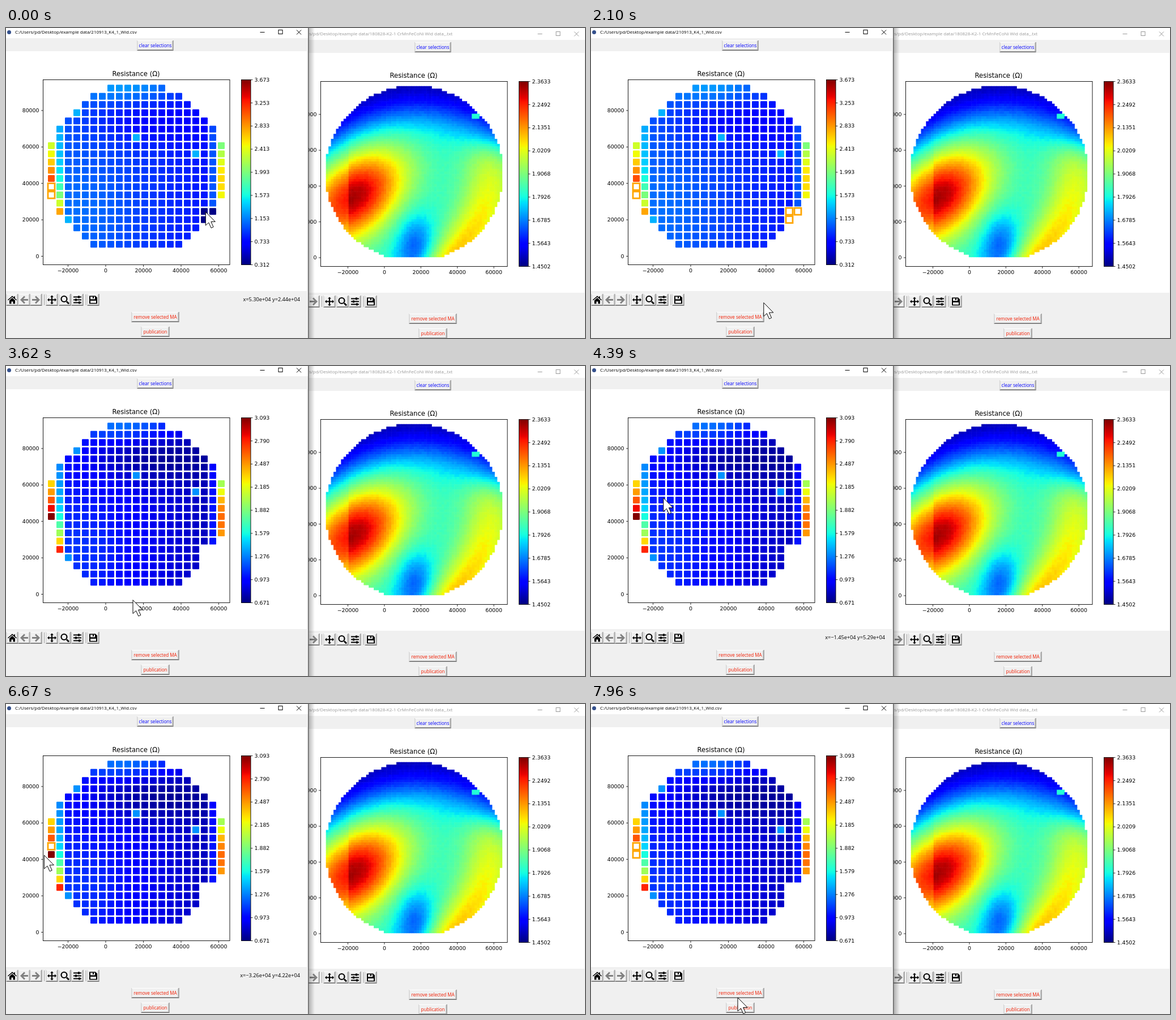
Animation, 1022 px wide and 548 px high, one loop 8000 ms. Source, as an HTML page with a canvas:

```html
<!DOCTYPE html>
<html lang="en">
<head>
<meta charset="utf-8">
<title>Resistance maps</title>
<style>
html, body { margin: 0; width: 100%; height: 100%; overflow: hidden; background: #f0f0f0; }
canvas { display: block; }
</style>
</head>
<body>
<canvas id="stage" width="1022" height="548"></canvas>
<script>
const LOOP = 8000, STEP = 70, PHASE = 20;
const UI = '"Open Sans", sans-serif', PLOT = '"DejaVu Sans", sans-serif';
const stage = document.getElementById('stage').getContext('2d');
let g = stage;

const clamp = v => Math.max(0, Math.min(1, v));
const sigmoid = v => 1 / (1 + Math.exp(-v));

function jet(t) {
  t = clamp(t);
  const channels = [
    Math.min((t - .35) / .31, 1 - (t - .89) / .22),
    Math.min((t - .125) / .25, (.91 - t) / .27),
    Math.min(.5 + t / .22, (.65 - t) / .31)
  ];
  return `rgb(${channels.map(c => Math.round(255 * clamp(c)))})`;
}

function rect(x, y, w, h, color) {
  g.fillStyle = color;
  g.fillRect(x, y, w, h);
}

function text(string, x, y, size, font, color = '#000', align = 'center') {
  g.font = `${size}px ${font}`;
  g.fillStyle = color;
  g.textAlign = align;
  g.textBaseline = 'middle';
  g.fillText(string, x, y);
}

function line(color, width, ...points) {
  g.strokeStyle = color;
  g.lineWidth = width;
  g.beginPath();
  for (const [x, y] of points) g.lineTo(x, y);
  g.stroke();
}

// ---- window furniture ----

function bevel(x, y, w, h, sunken) {
  const [light, dark] = sunken ? ['#696969', '#fff'] : ['#fff', '#696969'];
  rect(x, y, w, h, dark);
  rect(x, y, w - 1, h - 1, light);
  rect(x + 1, y + 1, w - 2, h - 2, sunken ? '#e6e6e6' : '#a0a0a0');
  rect(x + 1, y + 1, w - 3, h - 3, '#f0f0f0');
}

function button(label, y, width, color, pressed) {
  bevel(263.5 - width / 2, y - 9, width, 18, pressed);
  text(label, 263.5, y + .5, 8.1, UI, pressed ? '#000' : color);
}

const ARROW = 'M-7 0L0-7L2-5L-1.5-1.6H7V1.6H-1.5L2 5L0 7Z';
const ICONS = [
  [11, 'M-8 0L0-7L3-4.4V-6H5V-2.6L8 0L7 1L0-5L-7 1ZM-5 1L0-3.4L5 1V7H1.5V3H-1.5V7H-5Z'],
  [32, ARROW, '#808080'],
  [53, ARROW, '#808080', -1],
  [81, 'M0-8L3-5H1V-1H5V-3L8 0L5 3V1H1V5H3L0 8L-3 5H-1V1H-5V3L-8 0L-5-3V-1H-1V-5H-3Z'],
  [104, 'M2 4L4 2L8 6L6 8Z'],
  [126, 'M-7-6H7V-4H-7ZM-7-1H7V1H-7ZM-7 4H7V6H-7ZM1-7H4V-3H1ZM-4-2H-1V2H-4ZM2 3H5V7H2Z', '#000', 1, 'nonzero'],
  [154, 'M-7-7H4L7-4V7H-7ZM-5-5.5V-1H3V-5.5H1V-2.5H-1V-5.5ZM-5 1.5V5.5H5V1.5Z']
];

function toolbar() {
  for (const [x, shape, color = '#000', flip = 1, rule = 'evenodd'] of ICONS) {
    bevel(x - 10.5, 470, 21, 21);
    g.save();
    g.translate(x, 480.5);
    g.scale(flip, 1);
    g.fillStyle = color;
    g.fill(new Path2D(shape), rule);
    if (x === 104) {
      g.lineWidth = 2.2;
      g.strokeStyle = color;
      g.beginPath();
      g.arc(-1.5, -1.5, 5, 0, 7);
      g.stroke();
    }
    g.restore();
  }
  for (const x of [67, 140.5]) rect(x, 471, 1, 19, '#a0a0a0');
}

function frame(title, titleX, ink, pressed) {
  rect(0, -3, 533, 560, '#f0f0f0');
  rect(0, -3, 533, 21, '#fff');
  rect(0, 41, 531, 424, '#fff');
  text(title, titleX, 7.8, 8, UI, ink, 'left');
  line(ink, 1, [448.5, 7.5], [456.5, 7.5]);
  g.strokeRect(481, 3.5, 7, 7);
  line(ink, 1, [513, 3.5], [521, 11.5]);
  line(ink, 1, [521, 3.5], [513, 11.5]);
  button('clear selections', 31, 64, '#00f');
  button('remove selected MA', 511, 84, '#f21c00', pressed);
  button('publication', 537, 50, '#f21c00');
  toolbar();
}

function colorbar(low, high, digits) {
  const ramp = g.createLinearGradient(0, 418.5, 0, 91.5);
  for (let i = 0; i <= 100; i++) ramp.addColorStop(i / 100, jet(i / 100));
  rect(415.5, 91.5, 16.5, 327, ramp);
  for (let i = 0; i <= 8; i++) {
    const y = 418.5 - i * 40.87;
    line('#000', .8, [432, y], [435.5, y]);
    text((low + (high - low) * i / 8).toFixed(digits), 438.5, y + .7, 9.4, PLOT, '#000', 'left');
  }
  g.strokeStyle = '#000';
  g.lineWidth = .9;
  g.strokeRect(415.5, 91.5, 16.5, 327);
}

function axes({ x0, dx, y0, dy }) {
  text('Resistance (Ω)', 229.5, 82.3, 11.6, PLOT);
  for (let i = 0; i < 5; i++) {
    const x = x0 + dx * i, y = y0 - dy * i;
    line('#000', .8, [x, 418.5], [x, 422]);
    line('#000', .8, [65.5, y], [62, y]);
    text(String((i - 1) * 20000).replace('-', '−'), x, 430, 9.4, PLOT);
    text(String(i * 20000), 58.5, y + .7, 9.4, PLOT, '#000', 'right');
  }
  g.strokeStyle = '#000';
  g.lineWidth = .9;
  g.strokeRect(65.5, 91.5, 329.5, 327);
}

// ---- dense map in the rear window; u and v run from -1 to 1 ----

function denseLevel(u, v) {
  const plateau = .39 * sigmoid((v + .7 - .35 * u * u + .06 * u) / .15);
  const du = u + .7, dv = v - .3;
  const hotSpot = .58 * Math.exp(-(du * du / .3 + dv * dv / .26 + 3 * du * dv));
  const crest = .88 - .45 * v * v;
  const ridge = (.22 + .1 * v) * sigmoid((v + .3) / .08) * Math.exp(-(((u - crest) / .34) ** 2));
  const tongue = .22 * sigmoid((v - .6) / .12) * Math.exp(-((u - .02) ** 2) / .05);
  return plateau + hotSpot * (u < -.74 ? .87 : 1) + ridge - tongue;
}

function denseMap() {
  const columns = 70, rows = 68, pitch = 4.44;
  let seed = 7;
  const random = () => (seed = seed * 16807 % 2147483647) / 2147483647;
  for (let r = 0; r < rows; r++) {
    for (let c = 0; c < columns; c++) {
      const x = 75 + (c + .5) * pitch, y = 100 + (r + .5) * pitch;
      if (Math.hypot((x - 230.5) / 157, (y - 254) / 154.5) > 1) continue;
      const chip = x > 332 && x < 346 && y > 149 && y < 158;
      const level = chip ? .39 : denseLevel((x - 230) / 155, (y - 251) / 152);
      rect(x - 2.5, y - 2.5, 5, 5, jet(level + (random() - .5) * .016));
    }
  }
}

// ---- coarse map in the front window ----

const SELECTED_AT = {
  '0,12': 0, '0,13': 0, '18,15': 520, '19,15': 1070, '18,16': 1480, '0,10': 5180, '0,11': 7350
};
const REMOVED_AT = 3280;
const WARM_CELLS = ['3,3', '10,6', '17,8', '2,16'];

function resistance(c, r) {
  const cell = `${c},${r}`, k = r - 7;
  if (WARM_CELLS.includes(cell)) return 1.32;
  if (cell in SELECTED_AT && c > 10) return .33;
  if (c === 0) return 2.33 + .13 * k + .015 * k * k;
  if (c === 20) return 2 + .6 * Math.sin(k * .367);
  if (c === 1) return 1.3 + .02 * (r - 5) + .000128 * (r - 5) ** 4;
  const dip = .17 * Math.exp(-((c - 11) ** 2 / 60 + (r - 4) ** 2 / 8));
  const top = .32 * Math.exp(-(r * r / 3 + (c - 9) ** 2 / 40));
  const lowerLeft = .09 * Math.exp(-((c - 5) ** 2 + (r - 15) ** 2) / 30);
  const rim = c === 19 ? .22 : 0;
  return 1.06 - .014 * c - dip + top + lowerLeft + rim;
}

function coarseMap(time, low, high) {
  const marked = [];
  for (let r = 0; r < 20; r++) {
    for (let c = 0; c <= 20; c++) {
      if ((c - 10) ** 2 + (r - 10) ** 2 > 110) continue;
      const x = 80 + 15 * c, y = 106.2 + 14.53 * r;
      const selected = SELECTED_AT[`${c},${r}`];
      if (selected < REMOVED_AT && time >= REMOVED_AT) continue;
      if (selected <= time) { marked.push([x, y]); continue; }
      g.fillStyle = jet((resistance(c, r) - low) / (high - low));
      g.beginPath();
      g.roundRect(x - 6, y - 6, 12, 12, 1.2);
      g.fill();
    }
  }
  g.strokeStyle = '#ffa500';
  g.lineWidth = 2.8;
  for (const [x, y] of marked) {
    rect(x - 6, y - 6, 12, 12, '#fff');
    g.strokeRect(x - 6, y - 6, 12, 12);
  }
}

// ---- pointer ----

// Time, x and y; the pointer moves straight between these.
const PATH = [
  [0, 352.3, 325], [450, 352.3, 325], [800, 361, 309], [1000, 361, 309],
  [1140, 346.8, 341.4], [1480, 346.8, 341.4], [2170, 296, 516], [2800, 277, 513],
  [3210, 277, 513], [4280, 127.8, 233.2], [4390, 127.8, 233.2], [4800, 70, 231],
  [5550, 88.9, 272.8], [5620, 91, 275], [5970, 105, 480], [6600, 67.6, 267.7],
  [7280, 66, 264], [7930, 259, 519], [LOOP, 259, 519]
];

function pointerAt(time) {
  const t = Math.max(0, time);
  const i = PATH.findIndex(key => key[0] > t);
  const [t0, x0, y0] = PATH[i - 1], [t1, x1, y1] = PATH[i];
  const f = (t - t0) / (t1 - t0);
  return [x0 + (x1 - x0) * f, y0 + (y1 - y0) * f];
}

function scientific(v) {
  return v.toExponential(2).replace('-', '−').replace(/e(.)(\d)$/, (_, sign, d) => `e${sign}0${d}`);
}

function readout([x, y]) {
  if (x < 65 || x > 395 || y < 91 || y > 418.5) return;
  const label = `x=${scientific((x - 176) * 300.75)} y=${scientific((403.5 - y) * 310.7)}`;
  text(label, 519, 480.8, 9.2, UI, '#000', 'right');
}

const CURSOR = new Path2D('M0 0V24L5.5 19L9.8 28.5L13.8 26.7L9.6 17.4H17Z');

function cursor([x, y]) {
  g.save();
  g.translate(x, y);
  g.fillStyle = '#fff';
  g.strokeStyle = '#000';
  g.lineWidth = 1;
  g.fill(CURSOR);
  g.stroke(CURSOR);
  g.restore();
}

// ---- scene ----

function makeRearWindow() {
  const canvas = document.createElement('canvas');
  canvas.width = 1022;
  canvas.height = 548;
  g = canvas.getContext('2d');
  g.translate(490, 3);
  frame('s/pd/Desktop/example data/180828-K2-1 CrMnFeCoNi Wid data_.txt', 45, '#999');
  denseMap();
  axes({ x0: 113.5, dx: 64.4, y0: 403, dy: 63.3 });
  colorbar(1.4502, 2.36334, 4);
  const shadow = g.createLinearGradient(44, 0, 55, 0);
  shadow.addColorStop(0, 'rgba(0,0,0,.28)');
  shadow.addColorStop(1, 'rgba(0,0,0,0)');
  rect(44, -3, 11, 551, shadow);
  g = stage;
  return canvas;
}

const rearWindow = makeRearWindow();

function draw(t) {
  const time = Math.max(0, Math.floor((t - PHASE) / STEP) * STEP + PHASE);
  const [low, high] = time < REMOVED_AT ? [.3124, 3.6734] : [.6706, 3.0931];
  g.drawImage(rearWindow, 0, 0);
  frame('C:/Users/pd/Desktop/example data/210913_K4_1_Wid.csv', 16, '#000', time >= 3070 && time < 3210);
  g.fillStyle = '#34508c';
  g.beginPath();
  g.arc(5.5, 7.5, 3.5, 0, 7);
  g.fill();
  coarseMap(time, low, high);
  axes({ x0: 109.5, dx: 66.5, y0: 403.5, dy: 64.4 });
  colorbar(low, high, 3);
  readout(pointerAt(time - STEP));
  rect(533, 0, 1.5, 548, '#666');
  cursor(pointerAt(time));
}

function tick() {
  draw(performance.now() % LOOP);
  requestAnimationFrame(tick);
}
tick();
</script>
</body>
</html>
```
